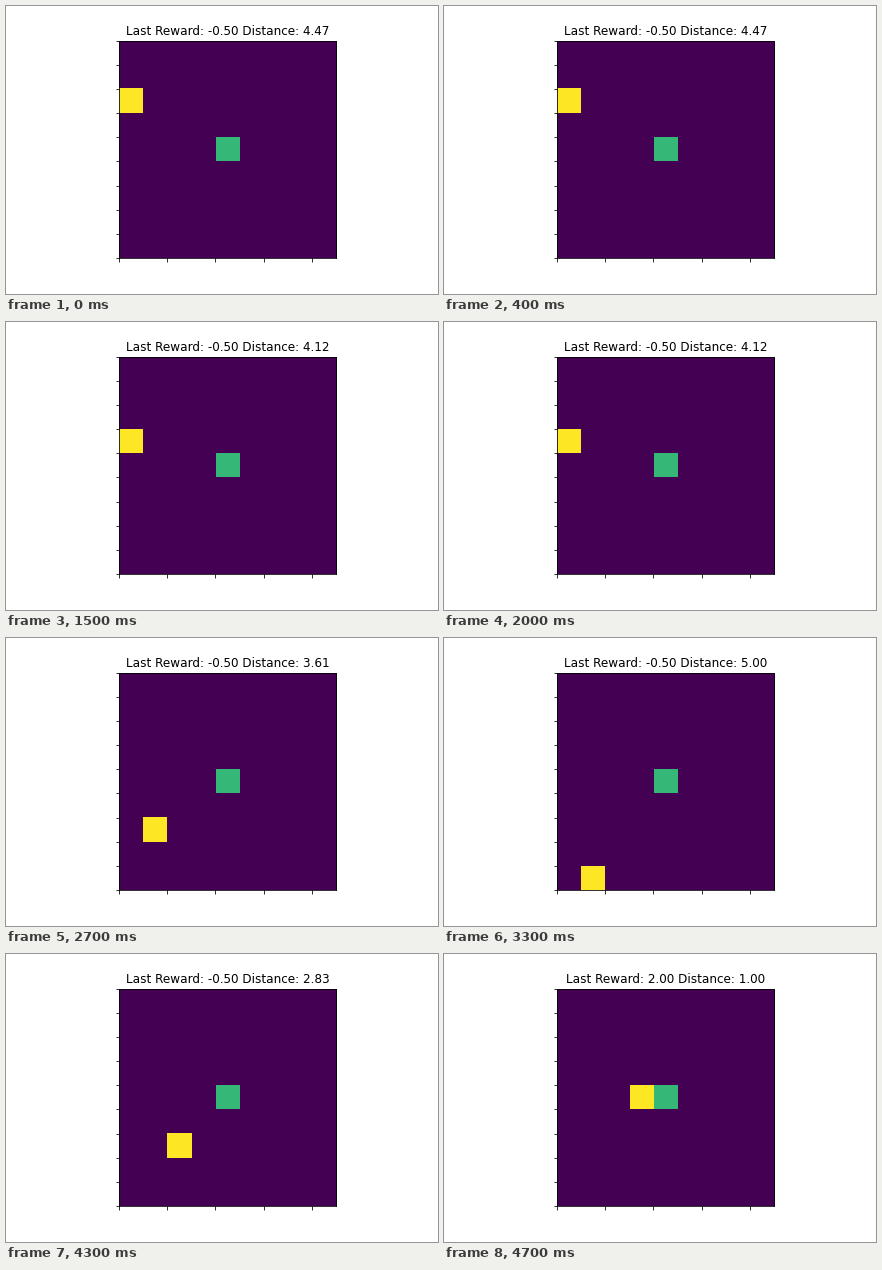
Recreate the animation shown at these times as a matplotlib script. Size 432x288 px, loop 10 s.

```python
import math

import numpy as np
import matplotlib.pyplot as plt
from matplotlib.animation import FuncAnimation

SIZE = 9
START = (0, 2)
GOAL = (4, 4)
STEP_MS = 100
FRAMES = 100
AGENT, TARGET = 3, 2
STEPS = {"U": (0, -1), "D": (0, 1), "L": (-1, 0), "R": (1, 0), ".": (0, 0)}
# One letter per step; a move into a wall leaves the agent in place.
MOVES = ("URLDU" "L" "RDLRL" "L" "RDLURL" "L" "DD" "L"
         "DRLDRDRLDLR" "LRL" "L" "RLRUURUUR" ".")


def clamp(value):
    return min(max(value, 0), SIZE - 1)


def walk(moves):
    x, y = START
    path = [(x, y)]
    for move in moves:
        dx, dy = STEPS[move]
        x, y = clamp(x + dx), clamp(y + dy)
        path.append((x, y))
    return path


PATH = walk(MOVES)


def board(x, y):
    grid = np.zeros((SIZE, SIZE))
    grid[GOAL[1], GOAL[0]] = TARGET
    grid[y, x] = AGENT
    return grid


def caption(x, y, reward):
    distance = math.hypot(x - GOAL[0], y - GOAL[1])
    return f"Last Reward: {reward:.2f} Distance: {distance:.2f}"


plt.rcParams["font.family"] = "DejaVu Sans"
fig = plt.figure(figsize=(6, 4), dpi=72, facecolor="white")
fig.subplots_adjust(left=0.125, right=0.9, bottom=0.125, top=0.88)
ax = fig.add_subplot()
image = ax.imshow(board(*START), cmap="viridis", vmin=0, vmax=AGENT,
                  interpolation="nearest", extent=(0, SIZE, 0, SIZE))
ax.set_xticks(range(0, SIZE + 1, 2))
ax.set_yticks(range(SIZE + 1))
ax.tick_params(labelbottom=False, labelleft=False)
title = ax.set_title(caption(*START, -0.5), fontsize=12)


def draw(frame):
    step = min(frame, len(MOVES))
    x, y = PATH[step]
    # The reward for reaching the goal shows one step after arrival.
    reward = 2.0 if step == len(MOVES) else -0.5
    image.set_data(board(x, y))
    title.set_text(caption(x, y, reward))
    return image, title


anim = FuncAnimation(fig, draw, frames=FRAMES, interval=STEP_MS,
                     repeat=True, repeat_delay=0, blit=False)
plt.show()
```
